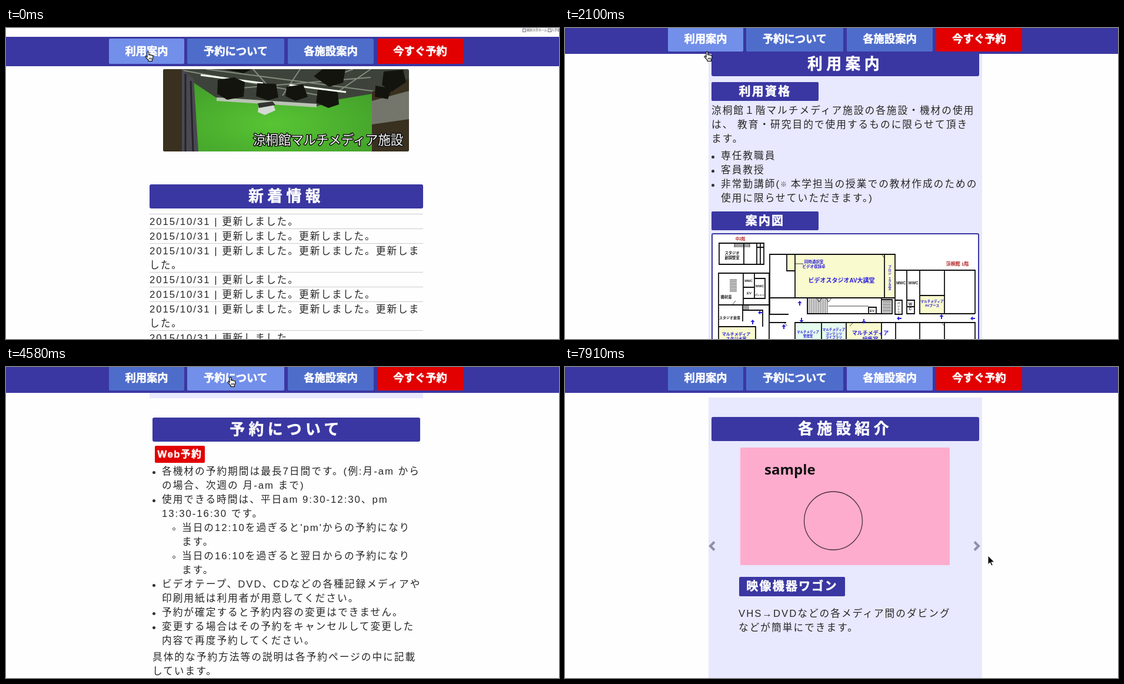
An HTML page that plays this animation: 940 by 529 pixels, repeating every 8 s.

```html
<!DOCTYPE html>
<html lang="ja">
<head>
<meta charset="utf-8">
<title>施設案内</title>
<style>
html, body { margin: 0; width: 100%; height: 100%; overflow: hidden; background: #fefefe; }
body { font: 16.7px/24px 'Liberation Sans', 'Noto Sans CJK JP', 'Noto Sans CJK', sans-serif; color: #262626; }
#stage { position: relative; width: 940px; height: 529px; overflow: hidden; }
#stage div, #stage svg, #stage p, ul { position: absolute; margin: 0; padding: 0; white-space: nowrap; }
svg { overflow: hidden; display: block; }
#page { left: 0; top: 0; width: 940px; letter-spacing: 2px; }
.section { left: 244px; width: 465px; }
.tint { background: #e8e8fe; }
.bar, .tag, #nav div { color: #fff; font-weight: 700; text-align: center; -webkit-text-stroke: .5px #fff; }
#stage .bar { left: 5px; width: 455px; height: 41px; border-radius: 3px; background: #3a37a2;
  font-size: 25.8px; line-height: 40px; letter-spacing: 6.4px; }
#stage .tag { left: 5px; width: 182px; height: 32px; border-radius: 2px; background: #3a37a2;
  font-size: 20px; line-height: 32px; letter-spacing: 2.2px; }
#stage .red { background: #e20000; font-size: 16.7px; letter-spacing: 1.5px; line-height: 29px; }
#news { left: 244px; top: 316px; width: 465px; }
#news p { position: static; border-top: 1px solid #ccc; }
#news span { position: relative; top: 1px; }
ul { list-style: none; left: 21px; }
li { position: relative; }
li::before { content: ''; position: absolute; box-sizing: border-box; left: -16px; top: 11px; width: 5px; height: 5px;
  border-radius: 50%; background: #333; }
ul ul { position: static !important; padding-left: 34px !important; }
li li::before { border: 1px solid #333; background: none; }
small { font-size: 11px; font-weight: 700; letter-spacing: 0; vertical-align: 1px; line-height: 1; }
#nav { left: 0; top: 15px; width: 940px; height: 50px; background: #3a37a2; }
#nav div { top: 3px; height: 43px; border-radius: 2px; background: #4e6dcb; font-size: 18.3px; line-height: 43px; }
#corner { left: 877px; top: 0; width: 63px; height: 8px; overflow: hidden; border-radius: 2px 0 0 2px; background: #fafafa;
  color: #555; font-size: 5px; line-height: 7px; }
#corner i { position: absolute; top: 1px; width: 4px; height: 4px; border: .5px solid #778; }
.arrow { fill: none; stroke: #918fa8; stroke-width: 4; }
</style>
</head>
<body>
<div id="stage">
  <div id="page">
    <svg style="left:267px;top:70px;border-radius:3px" width="418" height="140" viewBox="267 70 418 140">
      <defs><radialGradient id="green" cx=".45" cy=".6" r=".7">
        <stop offset="0" stop-color="#58c534"/><stop offset="1" stop-color="#43a02a"/></radialGradient></defs>
      <path fill="#3d433a" d="M267 70h418v140H267z"/>
      <path fill="none" stroke="#838b7d" stroke-width="2" d="M300 72l230 42M340 70l290 38M420 70l40 45M500 70l-30 45M620 70l-70 48M590 70l-60 22M400 102l220-18"/>
      <path fill="url(#green)" d="M319 93l42 28 165 13 36-12 60-10v98H322z"/>
      <path fill="none" stroke="#b9c3b3" stroke-width="6" d="M358 121l170 11"/>
      <path fill="none" stroke="#f4fff0" stroke-width="3" d="M331 80l106 14M482 97l96 12"/>
      <path fill="#39301f" d="M267 70h33v140h-33zM622 108l63-22v124h-63z"/>
      <path fill="#4a4850" d="M299 70l20 16 8 124h-28z"/>
      <path fill="none" stroke="#24232b" stroke-width="3" d="M305 78v132M314 90l4 120"/>
      <path fill="#74766b" d="M622 124l63-17v48l-63 9z"/>
      <path fill="#14140f" d="M360 88l28-4 18 8-2 25-28 5-17-10zM427 94l32 1 4 23-18 5-20-7zM477 100l28-4 8 21-21 7-17-8zM530 105l34 4 2 21-18 6-21-9zM538 70h39l-4 23-24 7-26-18zM642 74l33-3 5 21-24 16-17-11zM370 70h48l-14 7zM628 98l28 5-7 18-22-4z"/>
      <path fill="#d5d9d5" d="M430 130l23-4 5 14-18 8-12-5z"/>
      <path fill="#333" d="M428 128l25-3 5 6-28 5z"/>
      <text x="420" y="198" font-size="21.4" font-weight="500" letter-spacing="0" fill="#fff" stroke="#111" stroke-width="3" stroke-linejoin="round" paint-order="stroke">涼桐館マルチメディア施設</text>
    </svg>
    <div class="bar" style="left:244px;top:266px;width:465px">新着情報</div>
    <div id="news"></div>

    <div class="section tint" style="top:758px;height:682px">
      <div class="bar" style="top:33px">利用案内</div>
      <div class="tag" style="top:84px">利用資格</div>
      <p style="left:5px;top:121px">涼桐館１階マルチメディア施設の各施設・機材の使用<br>は、 教育・研究目的で使用するものに限らせて頂き<br>ます。</p>
      <ul style="top:198px">
        <li>専任教職員</li><li>客員教授</li>
        <li>非常勤講師(<small>※</small> 本学担当の授業での教材作成のための<br>使用に限らせていただきます。)</li>
      </ul>
      <div class="tag" style="top:304px">案内図</div>
      <svg id="plan" style="left:5px;top:341px;border:2px solid #3a37a2;border-radius:3px;background:#fff" width="451" height="302" viewBox="251 351 451 302" letter-spacing="0"></svg>
    </div>

    <div class="section" style="top:1440px;height:650px">
      <div class="bar" style="top:33px">予約について</div>
      <div class="tag red" style="left:9px;top:81px;width:85px;height:29px">Web予約</div>
      <ul style="top:113px">
        <li>各機材の予約期間は最長7日間です。(例:月-am から<br>の場合、次週の 月-am まで)</li>
        <li>使用できる時間は、平日am 9:30-12:30、pm<br>13:30-16:30 です。
          <ul><li>当日の12:10を過ぎると'pm'からの予約になり<br>ます。</li>
          <li>当日の16:10を過ぎると翌日からの予約になり<br>ます。</li></ul></li>
        <li>ビデオテープ、DVD、CDなどの各種記録メディアや<br>印刷用紙は利用者が用意してください。</li>
        <li>予約が確定すると予約内容の変更はできません。</li>
        <li>変更する場合はその予約をキャンセルして変更した<br>内容で再度予約してください。</li>
      </ul>
      <p style="left:5px;top:429px">具体的な予約方法等の説明は各予約ページの中に記載<br>しています。</p>
    </div>

    <div class="section tint" style="top:2090px;height:600px">
      <div class="bar" style="top:33px">各施設紹介</div>
      <svg style="left:54px;top:85px;border-radius:2px;background:#feaccd" width="356" height="200">
        <text x="41" y="46" font-family="'Noto Sans','Open Sans',sans-serif" font-size="24" font-weight="600" letter-spacing="0" fill="#111">sample</text>
        <circle cx="158" cy="124.5" r="49.5" fill="none" stroke="#4b2f3d" stroke-width="1.3"/>
      </svg>
      <svg id="arrows" width="465" height="20" style="left:0;top:242px">
        <path class="arrow" d="M10 3.5l-7 7 7 7M452 3.5l7 7-7 7"/>
      </svg>
      <div class="tag" style="left:52px;top:305px;width:180px;height:33px">映像機器ワゴン</div>
      <p style="left:51px;top:356px">VHS→DVDなどの各メディア間のダビング<br>などが簡単にできます。</p>
    </div>
  </div>

  <div id="nav">
    <div style="left:175px;width:128px">利用案内</div>
    <div style="left:308px;width:165px">予約について</div>
    <div style="left:479px;width:146px">各施設案内</div>
    <div style="left:631px;width:146px;background:#e20000">今すぐ予約</div>
  </div>
  <div id="corner"><i style="left:1px"></i><i style="left:44px"></i>
    <div style="left:8px">霧原大学ホーム</div><div style="left:50px">入学案内</div></div>
  <svg id="hand" width="17" height="20" style="left:0;top:0">
    <path fill="#fff" stroke="#111" stroke-width="1.2" stroke-linejoin="round" d="M4 11V2.6a1.4 1.4 0 0 1 2.8 0V7a1.3 1.3 0 0 1 2.5.3 1.3 1.3 0 0 1 2.4.6 1.2 1.2 0 0 1 2.1.8V12l-1.3 3v2.4H6v-1.9L1.2 10.6a1.3 1.3 0 0 1 1.9-1.7z"/>
    <path stroke="#111" d="M7.5 11.5v3M9.5 11.5v3M11.3 11.5v3"/>
  </svg>
  <svg id="pointer" width="14" height="20" style="left:-1px;top:-1px">
    <path fill="#000" stroke="#fff" d="M1 1v15l3.5-3.3 2.4 5.4 2.3-1-2.4-5.2H12z"/>
  </svg>
</div>
<script>
const LOOP = 8000;
const $ = id => document.getElementById(id);

// News list: short, medium and wrapped entries in turn
const news = '更新しました。';
const entries = [news, news.repeat(2), news.repeat(2) + '更新しま<br>した。'];
$('news').innerHTML = Array.from({ length: 12 }, (_, i) => `<p><span>2015/10/31 | ${entries[i % 3]}</span></p>`).join('');

// Floor plan
const BLUE = '#2a1fdc', BLACK = '#222', RED = '#b02020';
const fill = (color, d) => `<path fill="${color}" d="${d}"/>`;
const lines = (width, d) => `<path fill="none" stroke="#111" stroke-width="${width}" d="${d}"/>`;
const label = (x, y, size, color, ...rows) => rows.map((row, i) =>
  `<text x="${x}" y="${y + i * size * 1.2}" font-size="${size}" font-weight="700" text-anchor="middle" fill="${color}">${row}</text>`).join('');
const column = (x, y, size, color, word) => label(x, y, size / 1.2, color, ...word);
const mark = (x, y, turn) => `<path transform="translate(${x} ${y}) rotate(${turn})" fill="${BLUE}" d="M0-4l3.5 4H1v4h-2V0h-2.5z"/>`;
const stairs = (x, y, w, h, step) => {
  let d = '';
  for (let i = 0; i <= h; i += step) d += `M${x} ${y + i}h${w}`;
  return lines(.8, d);
};
$('plan').innerHTML =
  fill('#fafacf', 'M391 385h170v74H391zM377 385h14v28h-14zM604 455h42v31h-42zM262 508h62v90h-62zM478 501h60v100h-60z') +
  fill('#e4fbee', 'M391 501h87v100h-87z') +
  lines(1.8, 'M262 366h76v36h-76zM304 366v36M326 366v36M332 366v36M326 373h12' +
    'M261 417h86v54h-86zM303 417v54M303 441h19M322 417v43M322 426h18v34h-37M261 471v37h63v90h-63zM302 471v28M302 480h34v28M347 471v130' +
    'M348 385h213v74H348zM391 385v74M377 385v28h14M543 385v74M348 459v28h32M412 459v27h126v-27' +
    'M516 475h13v11h-13zM538 462h18v24h-18zM561 459v28h12v-24h-12M581 463h13v23h-13zM581 474h13' +
    'M561 412h136v74M581 412v51M603 412v74h94M645 412v74M604 455h42' +
    'M348 501h28M391 501h306v100H391zM436 501v100M478 501v100M538 501v100M562 501v100M603 501v100M645 501v100M261 598h130') +
  lines(.8, 'M391 401h14M427 459l5 7 5-7M443 459l5 7 5-7M284 471l6-7M538 385l5 6M288 366v7M314 366v7M372 501l6 6M490 501l-6 6M640 501l5 6') +
  stairs(280, 428, 12, 22, 2.5) + stairs(288, 368, 26, 5, 2) + stairs(540, 463, 14, 22, 2.5) + stairs(303, 472, 10, 7, 2) +
  lines(.8, Array.from({ length: 12 }, (_, i) => `M${413 + i * 3} 460v26`).join('') + 'M448 473h68') +
  label(298, 361, 6.5, RED, '中2階') + label(667, 404, 8, RED, '涼桐館 1階') +
  label(284, 385, 6.3, BLACK, 'スタジオ', '副調整室') + label(274, 460, 6.3, BLACK, '機材庫') + label(280, 495, 6, BLACK, 'スタジオ倉庫') +
  label(312, 432, 5.5, BLACK, 'MWC') + label(331, 441, 5.5, BLACK, 'WWC') + label(313, 453, 6, BLACK, 'EV') + label(331, 456, 4, BLACK, 'パントリ') +
  label(423, 400, 6.5, BLUE, '同時通訳室', 'ビデオ収録卓') + label(470, 433, 10, BLUE, 'ビデオスタジオAV大講堂') +
  column(552, 408, 6.2, BLUE, 'プロジェクタ室') + column(567, 470, 5, BLACK, 'パントリ') + column(587, 472, 8, BLACK, 'WC') +
  label(522, 483, 6, BLACK, 'EV') + label(571, 436, 6.5, BLACK, 'MWC') + label(592, 436, 6.5, BLACK, 'WWC') +
  label(624, 467, 5.7, BLUE, 'マルチメディア', 'AVブース') + label(291, 523, 7, BLUE, 'マルチメディア', 'スタジオ室') +
  label(413, 519, 5.5, BLUE, 'マルチメディア', '管理室') + label(457, 515, 5.6, BLUE, 'マルチメディア', 'コンテンツ', 'ライブラリ') +
  label(519, 522, 9, BLUE, 'マルチメディア', '編集室') +
  [[399, 468, 0], [402, 497, 180], [508, 499, 180], [372, 508, 0], [568, 494, -90], [693, 494, -90], [640, 491, 0], [319, 500, 0], [332, 484, -90]]
    .map(m => mark(...m)).join('');

// Motion: every value holds until the next step
function hold(el, property, steps, format = v => v) {
  const frames = steps.map(([time, ...value]) =>
    ({ offset: time / LOOP, [property]: format(...value), easing: 'steps(1, end)' }));
  frames.push({ ...frames[frames.length - 1], offset: 1 });
  el.animate(frames, { duration: LOOP, iterations: Infinity });
}
const shift = (x, y) => `translate(${x}px, ${y}px)`;
const swing = p => .5 - Math.cos(Math.PI * Math.min(p, 1)) / 2;

// Each page jump is a 500 ms swing sampled about every 210 ms
const jump = (from, to, phase, times) =>
  times.map((time, i) => [time, Math.round(from + (to - from) * swing(phase + .42 * i))]);
const scroll = [
  [0, 0],
  ...jump(0, 750, .104, [1470, 1680, 1890, 2100]),
  ...jump(750, 1388, .135, [4170, 4380, 4580, 4790]),
  ...jump(1388, 2038, .145, [6660, 6860, 7070])
];
hold($('page'), 'transform', scroll, y => shift(0, -y));
hold($('nav'), 'transform', scroll, y => shift(0, -Math.min(y, 21)));
hold($('corner'), 'opacity', [[0, 1], [1680, 0]]);
hold($('arrows'), 'opacity', [[0, 0], [7700, .5], [7910, 1]]);

const lit = on => on ? '#728fe9' : '#4e6dcb';
const [guide, booking, rooms] = $('nav').children;
hold(guide, 'backgroundColor', [[0, 1], [3140, 0]], lit);
hold(booking, 'backgroundColor', [[0, 0], [3340, 1], [5830, 0]], lit);
hold(rooms, 'backgroundColor', [[0, 0], [5830, 1]], lit);

hold($('hand'), 'transform', [
  [0, 236, 39], [2720, 239, 39], [2930, 258, 32], [3140, 298, 22], [3340, 345, 17], [3550, 376, 16],
  [5000, 378, 16], [5210, 380, 17], [5410, 392, 17], [5620, 434, 17], [5830, 490, 17], [6030, 524, 17], [6450, 524, 16]
], shift);
hold($('hand'), 'opacity', [[0, 1], [7280, 0]]);
hold($('pointer'), 'transform', [[0, 570, 70], [7490, 640, 121], [7700, 698, 235], [7910, 719, 321]], shift);
hold($('pointer'), 'opacity', [[0, 0], [7280, 1]]);
</script>
</body>
</html>
```
